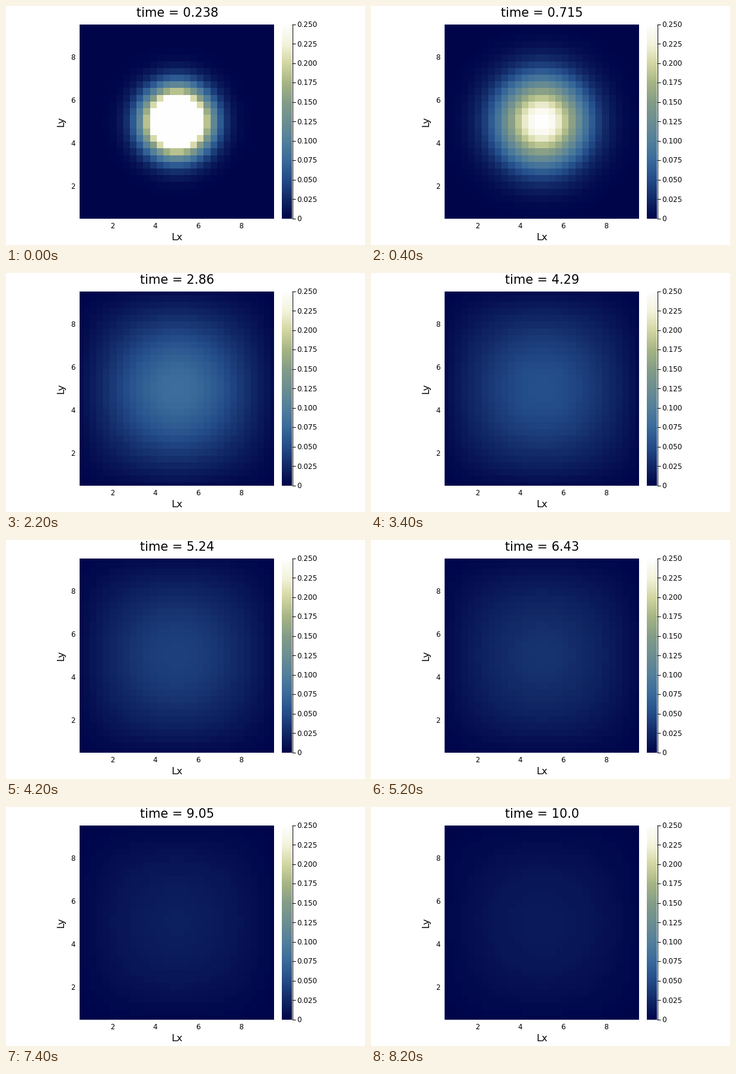
A matplotlib script for the animation above (8400 ms loop, 600 by 400 pixels).

```python
import numpy as np
import matplotlib.pyplot as plt
from matplotlib.animation import FuncAnimation
from matplotlib.colors import LinearSegmentedColormap

W, H, DPI = 600, 400, 100
FRAMES, INTERVAL, STEPS = 42, 200, 10
N, L, D = 32, 10.0, 1.0
VMAX = 0.25
LEFT, RIGHT, TOP, BOTTOM = 123, 448, 31, 356
BAR_L, BAR_R = 461, 478

plt.rcParams["font.family"] = "DejaVu Sans"

stops = [(0, 5, 74), (17, 40, 101), (35, 76, 137), (57, 106, 154),
         (83, 127, 155), (108, 142, 146), (132, 157, 136), (166, 181, 132),
         (211, 214, 161), (243, 243, 220), (254, 254, 254)]
cmap = LinearSegmentedColormap.from_list("deep", np.array(stops) / 255, N=256)

# Explicit diffusion of a Gaussian with fixed edge cells
dx = L / N
dt = dx**2 / D / 4.1
xc = np.linspace(dx / 2, L - dx / 2, N)


def step(u):
    new = u.copy()
    lap = (u[2:, 1:-1] + u[:-2, 1:-1] + u[1:-1, 2:] + u[1:-1, :-2]
           - 4 * u[1:-1, 1:-1])
    new[1:-1, 1:-1] += dt * D * lap / dx**2
    return new


def solve():
    bell = np.exp(-(xc - L / 2) ** 2)
    u = np.outer(bell, bell)
    fields = []
    for _ in range(FRAMES):
        for _ in range(STEPS):
            u = step(u)
        fields.append(u)
    return fields


def sig3(t):
    """Three significant digits, keeping at least one decimal."""
    return str(float(f"{t:.3g}"))


fig = plt.figure(figsize=(W / DPI, H / DPI), dpi=DPI, facecolor="white")


def panel(x0, x1, y0, y1):
    ax = fig.add_axes([x0 / W, 1 - y1 / H, (x1 - x0) / W, (y1 - y0) / H])
    ax.axis("off")
    return ax


page = panel(0, W, 0, H)
page.set(xlim=(0, W), ylim=(H, 0))


def label(x, y, s, size, ha="center", **kw):
    return page.text(x, y, s, fontsize=size, ha=ha, va="baseline",
                     color="black", **kw)


TICK, GUIDE, TITLE = 8.56, 11.77, 14.98

fields = solve()
lo, hi = xc[1], xc[-2]
plot = panel(LEFT, RIGHT, TOP, BOTTOM)
image = plot.imshow(fields[0], cmap=cmap, vmin=0, vmax=VMAX, origin="lower",
                    extent=(0, L, 0, L), interpolation="nearest",
                    aspect="auto")
plot.set(xlim=(lo, hi), ylim=(lo, hi))

scale = (RIGHT - LEFT) / (hi - lo)
for v in (2, 4, 6, 8):
    label(LEFT + (v - lo) * scale, 372, str(v), TICK)
    label(115.5, BOTTOM - (v - lo) * scale + 4.5, str(v), TICK, ha="right")
label(285.5, 392, "Lx", GUIDE)
label(96, 193.5, "Ly", GUIDE, rotation=90, rotation_mode="anchor")
title = label(286, 18.3, "", TITLE)

bar = panel(BAR_L, BAR_R, TOP, BOTTOM)
bar.imshow(np.linspace(0, 1, 256)[:, None], cmap=cmap, origin="lower",
           aspect="auto", interpolation="nearest")
line = dict(color="black", lw=0.72, solid_capstyle="butt")
page.plot([BAR_R + 0.5] * 2, [TOP - 0.5, BOTTOM - 0.5], **line)
for k in range(11):
    v = VMAX * k / 10
    y = BOTTOM - 0.5 - (BOTTOM - TOP) * k / 10
    page.plot([BAR_R, BAR_R + 6], [y, y], **line)
    label(486.3, y + 4.5, f"{v:.3f}" if k else "0", TICK, ha="left")


def update(i):
    image.set_data(fields[i])
    title.set_text("time = " + sig3((i + 1) * STEPS * dt))
    return image, title


anim = FuncAnimation(fig, update, frames=FRAMES, interval=INTERVAL,
                     repeat=True, repeat_delay=0)
plt.show()
```
